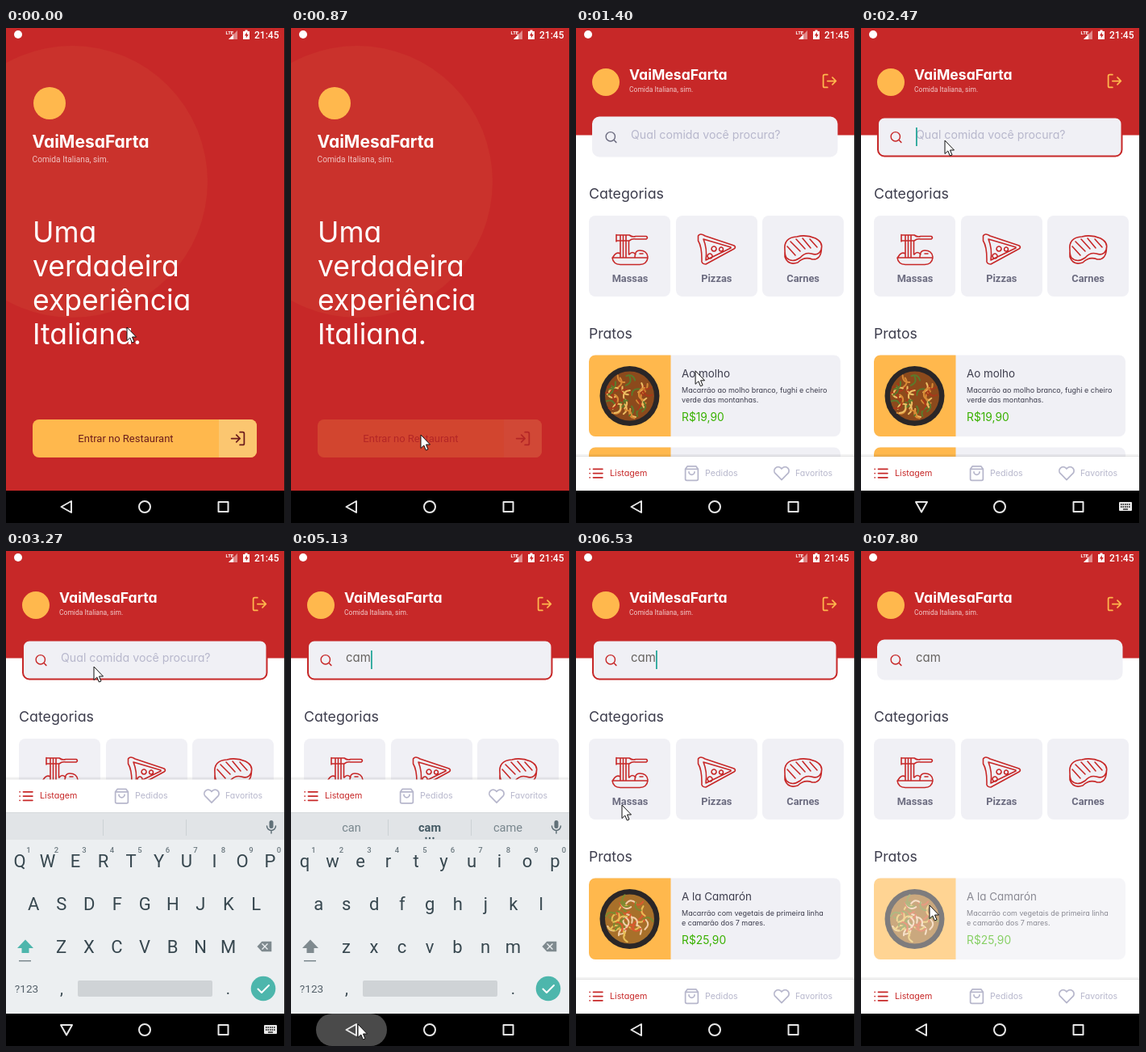
An HTML page that plays this animation: 346x612 px, repeating every 8000 ms.

```html
<!DOCTYPE html>
<html lang="pt">
<head>
<meta charset="utf-8">
<title>Comida Italiana</title>
<style>
html, body { margin: 0; width: 100%; height: 100%; overflow: hidden; background: #000; }
svg { display: block; }
text { white-space: pre; }
.p { font-family: Inter, "Open Sans", sans-serif; font-feature-settings: "cv11"; }
.r { font-family: Roboto, Arial, sans-serif; }
.line { fill: none; stroke-width: 2; stroke-linecap: round; stroke-linejoin: round; }
</style>
</head>
<body>
<svg id="stage" width="346" height="612" viewBox="0 0 346 612"></svg>
<script>
const LOOP = 8000;
const RED = '#C72828', GOLD = '#FFB84D', GREY = '#B7B7CC', PANEL = '#F0F0F5', INK = '#3D3D4D', KEY = '#37474F';
const BRAND = 'VaiMesaFarta';

// ---- drawing helpers ----
const txt = (cls, x, y, s, size, fill, more = '') =>
  `<text class="${cls}" x="${x}" y="${y}" font-size="${size}" fill="${fill}" ${more}>${s}</text>`;
const box = (x, y, w, h, fill, rx = 0, more = '') =>
  `<rect x="${x}" y="${y}" width="${w}" height="${h}" rx="${rx}" fill="${fill}" ${more}/>`;
const dot = (x, y, r, fill, more = '') => `<circle cx="${x}" cy="${y}" r="${r}" fill="${fill}" ${more}/>`;
const path = (d, more = '') => `<path d="${d}" ${more}/>`;
const icon = (x, y, size, color, d, more = '') =>
  `<g transform="translate(${x} ${y}) scale(${size / 24})">${path(d, `class="line" stroke="${color}" ${more}`)}</g>`;
const MID = 'text-anchor="middle"';

const ICONS = {
  enter: 'M15 3h4a2 2 0 0 1 2 2v14a2 2 0 0 1-2 2h-4M10 17l5-5-5-5M15 12H3',
  leave: 'M9 21H5a2 2 0 0 1-2-2V5a2 2 0 0 1 2-2h4M16 17l5-5-5-5M21 12H9',
  find: 'M19 11a8 8 0 1 1-16 0a8 8 0 0 1 16 0M21 21l-4.35-4.35',
  list: 'M8 6h13M8 12h13M8 18h13M3 6h.01M3 12h.01M3 18h.01',
  bag: 'M6 2L3 6v14a2 2 0 0 0 2 2h14a2 2 0 0 0 2-2V6l-3-4zM3 6h18M16 10a4 4 0 0 1-8 0',
  heart: 'M20.8 4.6a5.5 5.5 0 0 0-7.8 0L12 5.7l-1-1.1a5.5 5.5 0 0 0-7.8 7.8l1 1L12 21.2l7.800-7.800 1-1a5.500 5.500 0 0 0 0-7.800z'
};

function seeded(seed) {
  return () => (seed = (seed * 16807) % 2147483647) / 2147483647;
}

function plate(colors, seed) {
  const rnd = seeded(seed);
  let s = dot(66.500, 455, 37, '#2A2627') + dot(66.500, 455, 30.500, colors[0]);
  for (let i = 0; i < 44; i++) {
    const a = rnd() * 6.283, d = Math.sqrt(rnd()) * 25, turn = rnd() * 360;
    const x = 66.5 + Math.cos(a) * d, y = 455 + Math.sin(a) * d;
    s += path('M-6 0Q0 -6 6 1', `class="line" stroke="${colors[1 + i % 4]}" transform="translate(${x.toFixed(1)} ${y.toFixed(1)}) rotate(${turn.toFixed(0)})"`);
  }
  return s;
}

function dish(id, name, l1, l2, price, colors, seed) {
  return `<g id="${id}">` + box(16, 404.5, 312, 100.5, PANEL, 8) +
    path('M24 404.500H117.500V505H24a8 8 0 0 1-8-8V412.500a8 8 0 0 1 8-8z', `fill="${GOLD}"`) + plate(colors, seed) +
    txt('p', 131, 431.5, name, 13.4, INK) + txt('p', 131, 451, l1, 9, INK) + txt('p', 131, 463, l2, 9, INK) +
    txt('p', 131, 486, price, 13.8, '#39B100') + '</g>';
}

// ---- screens ----
function splash() {
  const lines = ['Uma', 'verdadeira', 'experiência', 'Italiana.'];
  return '<g id="splash">' + box(0, 0, 346, 572, RED) +
    dot(82, 190, 168, '#CA322C') + dot(54, 93, 20, GOLD) +
    txt('p', 32.5, 148, BRAND, 21, '#fff', 'font-weight="700"') +
    txt('r', 32.5, 166, 'Comida Italiana, sim.', 10.2, '#fff', 'opacity=".7"') +
    lines.map((s, i) => txt('p', 33, 265 + 42 * i, s, 35.5, '#fff')).join('') +
    '<g id="enter">' + box(33, 484, 278, 47, GOLD, 8) +
    path('M264 484h39a8 8 0 0 1 8 8v31a8 8 0 0 1-8 8h-39z', 'fill="#FBC670"') +
    txt('r', 148.5, 512, 'Entrar no Restaurant', 13, '#6C1C1C', MID) +
    icon(277, 497, 21, '#6C1C1C', ICONS.enter) + '</g></g>';
}

function categories() {
  const pasta = path('M45 284H89Q88 292 79 292.500H55Q46 292 45 284zM50 255.500V264M50 256H66Q70 259 74 257.500H87Q90 259 87 261H74Q70 260 66 263H50' +
    'M55 256V283M58.500 256V283M62 256V283M65.500 263V280M46 283Q50 276 55 279M66 280Q70 275 74 280M73 283Q73 275 79 275Q88 275 89 283M79 279h4');
  const pizza = path('M151.500 257Q154 253 160 257L196 269Q199 271 196 273L161 292Q155 292 156 286Q156 270 151.500 263zM158 261Q163 273 161 287M158 261L192 271M161 287L192 272' +
    'M171 270a3 3 0 1 0 .1 0M166 279a3 3 0 1 0 .1 0M180 271a2.500 2.500 0 1 0 .1 0');
  const steak = path('M259 275Q257 259 274 258Q285 255 297 260Q307 265 304 274Q301 282 292 279Q284 277 278 284Q268 291 261 284Q259 281 259 275zM259 277V283Q263 294 275 290Q283 282 293 286Q304 287 304.500 272' +
    'M262 270L272 281M266 264L278 276M273 261L284 273M281 260L291 272M290 261L299 271');
  const names = ['Massas', 'Pizzas', 'Carnes'];
  return names.map((n, i) => box([16, 124, 231][i], 232, 101, 100, PANEL, 8) +
    txt('r', 67 + 107.3 * i, 314, n, 12.8, '#6C6C80', MID + ' font-weight="700"')).join('') +
    `<g class="line" stroke="${RED}" style="stroke-width:1.6">${pasta + pizza + steak}</g>`;
}

function home() {
  return '<g>' + box(0, 0, 346, 572, '#fff') + box(0, 0, 346, 132.5, RED) + dot(37, 67, 17, GOLD) +
    txt('p', 66, 64, BRAND, 17.6, '#fff', 'font-weight="700"') +
    txt('r', 66, 79, 'Comida Italiana, sim.', 8.5, '#fff', 'opacity=".75"') +
    icon(304, 55, 21, GOLD, ICONS.leave) +
    box(21, 110.5, 302.5, 48, PANEL, 8, 'id="field" stroke-width="2"') +
    icon(35, 126.5, 17, RED, ICONS.find, 'id="lens"') +
    txt('p', 68, 137, '', 14.2, GREY, 'id="query"') + box(68, 123, 1.8, 23, '#26A69A', 0, 'id="caret"') +
    txt('p', 16, 211, 'Categorias', 17.8, INK) + categories() + txt('p', 16, 384, 'Pratos', 17.6, INK) +
    dish('sauce', 'Ao molho', 'Macarrão ao molho branco, fughi e cheiro', 'verde das montanhas.', 'R$19,90',
      ['#8C4A1C', '#D98A35', '#A8381A', '#EDBE62', '#5B7A2C'], 71) +
    `<g id="next">${box(16, 518.5, 312, 60, PANEL, 8) + path('M24 518.500H117.500V578H16V526.500a8 8 0 0 1 8-8z', `fill="${GOLD}"`)}</g>` +
    dish('shrimp', 'A la Camarón', 'Macarrão com vegetais de primeira linha', 'e camarão dos 7 mares.', 'R$25,90',
      ['#A8702A', '#E8BE55', '#D9592E', '#F3CDA6', '#7C8A30'], 1234) + '</g>';
}

function tabs() {
  return '<g id="tabs">' + box(0, 527, 346, 3, '#000', 0, 'opacity=".05"') + box(0, 529, 346, 1.5, '#000', 0, 'opacity=".06"') +
    box(0, 530, 346, 300, '#fff') +
    icon(14.5, 540, 21, RED, ICONS.list) + txt('p', 42, 553.5, 'Listagem', 10.7, RED) +
    icon(133, 540, 21, GREY, ICONS.bag) + txt('p', 160, 553.5, 'Pedidos', 10.7, GREY) +
    icon(244.5, 540, 21, GREY, ICONS.heart) + txt('p', 272, 553.5, 'Favoritos', 10.5, GREY) + '</g>';
}

function keyboard() {
  const row = (keys, x, y) => [...keys].map((k, i) =>
    txt('r', x + 34.5 * i, y, k, 22, KEY, MID + ' data-key="' + k + '"')).join('');
  const hints = [...'1234567890'].map((k, i) => txt('r', 28 + 34.5 * i, 373, k, 9.5, '#6B787F', MID + ' font-weight="500"')).join('');
  const words = [75, 172, 269].map((x, i) =>
    txt('r', x, 347, '', 14.6, i === 1 ? '#455A64' : '#78868D', MID + ' class="r word"' + (i === 1 ? ' font-weight="700"' : ''))).join('');
  return '<g id="keys">' + box(0, 323, 346, 34, '#E1E4E7') + box(0, 323, 346, 1, '#D5D9DC') + box(0, 357, 346, 215, '#ECEFF1') +
    box(120, 332, 1, 20, '#CBD1D4') + box(223, 332, 1, 20, '#CBD1D4') + words.replace(/class="r" (.*?) class="r word"/g, 'class="r word" $1') +
    '<g id="more">' + [167.5, 172, 176.5].map(x => dot(x, 355, 1.2, '#455A64')).join('') + '</g>' +
    box(326.5, 333, 5, 10, '#607078', 2.5) + path('M323.500 340a5.500 5.500 0 0 0 11 0M329 345.500V349', 'class="line" stroke="#607078" style="stroke-width:1.5"') +
    row('QWERTYUIOP', 17, 391) + hints + row('ASDFGHJKL', 34.300, 444) + row('ZXCVBNM', 68.500, 497) +
    path('M24 480.500L34 491H28.500V497H19.500V491H14z', 'id="shift"') + box(16, 506, 15, 1.5, '#7C888E') +
    path('M317 482H330V496H317L310.500 489zM317.500 485.500l7 7M324.500 485.500l-7 7', 'fill="#7F8A8F" stroke="#ECEFF1" stroke-width="1.400"') +
    txt('r', 25.5, 546, '?123', 13.6, '#546069', MID) + txt('r', 69, 548, ',', 20, KEY, MID) +
    box(89, 531, 167, 20, '#CFD3D6', 2) + txt('r', 275.5, 548, '.', 20, KEY, MID) +
    dot(319, 541, 15.3, '#4DB6AC') + path('M312.500 541.500l4.500 4.500 9-9', 'class="line" stroke="#fff"') + '</g>';
}

function chrome() {
  return dot(15, 8, 5, '#fff') + txt('r', 272.5, 8, 'LTE', 6, '#fff', 'font-weight="700"') +
    path('M287 3V14H276z', 'fill="#fff" opacity=".45"') + path('M282 8V14H276z', 'fill="#fff"') +
    path('M296.500 2.500h3v1.500h2.500v10h-8v-10h2.500z', 'fill="#fff"') +
    path('M298.800 5l-3 4.500h2v3l3-4.500h-2z', `fill="${RED}"`) +
    txt('r', 308, 13, '21:45', 12, '#fff', 'font-weight="500"') +
    box(0, 572, 346, 40, '#000') + box(31, 572, 88, 40, '#4A4A4A', 20, 'id="ripple"') +
    '<g class="line" stroke="#E8E8E8">' + path('M68.500 592L81 585V599z', 'id="back"') +
    '<circle cx="172" cy="592" r="7"/>' + path('M263.500 586h12v12h-12z') + '</g>' +
    '<g id="ime">' + box(320, 586, 16, 11, '#E8E8E8', 1) +
    path('M322 589h12M322 592h12', 'stroke="#000" stroke-width="1.400" stroke-dasharray="1.500 1"') +
    path('M325 595h6', 'stroke="#000" stroke-width="1.200"') + '</g>' +
    box(345, 0, 1, 612, '#1C1C1C') +
    path('M0 0V16.500L3.800 13L6.300 19L9 17.900L6.500 12H11.500z', 'id="mouse" fill="#fff" stroke="#111" stroke-width="1" stroke-linejoin="round"');
}

const stage = document.getElementById('stage');
stage.innerHTML = home() + splash() + tabs() + keyboard() + chrome();
// The opening screen covers the tab bar while it leaves.
stage.insertBefore(document.getElementById('tabs'), document.getElementById('splash'));

const el = {};
stage.querySelectorAll('[id]').forEach(n => el[n.id] = n);
const letters = [...stage.querySelectorAll('[data-key]')];
const words = [...stage.querySelectorAll('.word')];

// ---- motion ----
const clamp = v => Math.min(1, Math.max(0, v));
const ramp = (t, a, b) => clamp((t - a) / (b - a));
const ease = p => p * p * (3 - 2 * p);
const set = (n, k, v) => n.setAttribute(k, v);
const show = (n, on) => set(n, 'visibility', on ? 'visible' : 'hidden');
const within = (t, ...spans) => spans.some(([a, b]) => t >= a && t < b);

const TRAIL = [
  [30, 150, 370], [620, 161, 503], [1200, 161, 503], [1860, 103, 146], [2120, 103, 146], [2195, 104, 139],
  [2480, 104, 139], [2660, 109, 141], [3190, 109, 141], [3265, 109, 143], [4010, 109, 143], [4190, 181, 300],
  [4325, 111, 472], [4480, 111, 472], [4920, 83, 585], [5330, 83, 585], [5865, 73, 440], [5925, 90, 471],
  [6220, 90, 471], [6520, 57, 314], [6560, 57, 314], [6800, 95, 420], [7030, 95, 420], [7125, 95, 430],
  [7230, 95, 430], [7325, 87, 461], [7550, 87, 461], [7665, 85, 438]
];

function pointer(t) {
  let i = TRAIL.findIndex(k => k[0] > t);
  if (i === 0) i = 1;
  if (i < 0) i = TRAIL.length - 1;
  const [a, b] = [TRAIL[i - 1], TRAIL[i]];
  const p = ease(ramp(t, a[0], b[0]));
  return [a[1] + (b[1] - a[1]) * p, a[2] + (b[2] - a[2]) * p];
}

function fade(p) {
  if (p < 0.5) return p * 0.5;
  return p < 0.9 ? 0.25 + (p - 0.5) * 1.125 : 0.7 + (p - 0.9) * 3;
}

// typed text, caret x and suggestions
const TYPED = [
  [0, '', 68, ['', '', '']],
  [3460, 'c', 77.5, ['can', 'c', 'come']],
  [3525, 'ca', 86.5, ['can', 'ca', 'cat']],
  [3590, 'cam', 99, ['can', 'cam', 'came']]
];

function draw(t) {
  set(el.enter, 'opacity', 1 - 0.8 * ramp(t, 720, 865));
  const p = 1 - ramp(t, 1043, 1193);
  show(el.splash, p > 0);
  set(el.splash, 'opacity', fade(p));
  set(el.splash, 'transform', `translate(0 ${(45 * (1 - p)).toFixed(2)})`);

  const focus = within(t, [2460, 7060]);
  const [, text, caretX, hints] = TYPED.filter(k => k[0] <= t).pop();
  set(el.field, 'stroke', focus ? RED : PANEL);
  set(el.lens, 'stroke', focus || text ? RED : '#6C6C80');
  el.query.textContent = text || 'Qual comida você procura?';
  set(el.query, 'fill', text ? '#666360' : GREY);
  set(el.query, 'font-size', text ? 15 : 14.2);
  set(el.caret, 'x', caretX);
  show(el.caret, within(t, [2460, 2920], [3440, 4120], [4620, 5620], [6120, 6620]));

  const found = t >= 5000;
  show(el.sauce, !found);
  show(el.next, !found);
  show(el.shrimp, found);
  set(el.shrimp, 'opacity', 1 - 0.4 * ramp(t, 7695, 7795));

  set(el.tabs, 'transform', `translate(0 ${within(t, [2660, 5190]) ? -247.5 : 0})`);
  const up = ease(ramp(t, 2590, 2800)) * (1 - ease(ramp(t, 5180, 5340)));
  show(el.keys, up > 0);
  set(el.keys, 'opacity', up);
  set(el.keys, 'transform', `translate(0 ${(130 * (1 - up)).toFixed(2)})`);
  letters.forEach(n => n.textContent = text ? n.dataset.key.toLowerCase() : n.dataset.key);
  words.forEach((n, i) => n.textContent = hints[i]);
  set(el.more, 'opacity', text ? 1 : 0);
  set(el.shift, 'fill', text ? '#7F8A8F' : '#4DB6AC');

  const ime = within(t, [2460, 5120]);
  set(el.back, 'd', ime ? 'M75 598.500L68 586H82z' : 'M68.500 592L81 585V599z');
  set(el.ime, 'opacity', ime ? 1 : 0);
  set(el.ripple, 'opacity', ramp(t, 5040, 5115) * (1 - ramp(t, 5190, 5450)));

  const [x, y] = pointer(t);
  set(el.mouse, 'transform', `translate(${x.toFixed(1)} ${y.toFixed(1)})`);
}

const start = performance.now();
function tick() {
  draw((performance.now() - start) % LOOP);
  requestAnimationFrame(tick);
}
draw(0);
tick();
</script>
</body>
</html>
```
